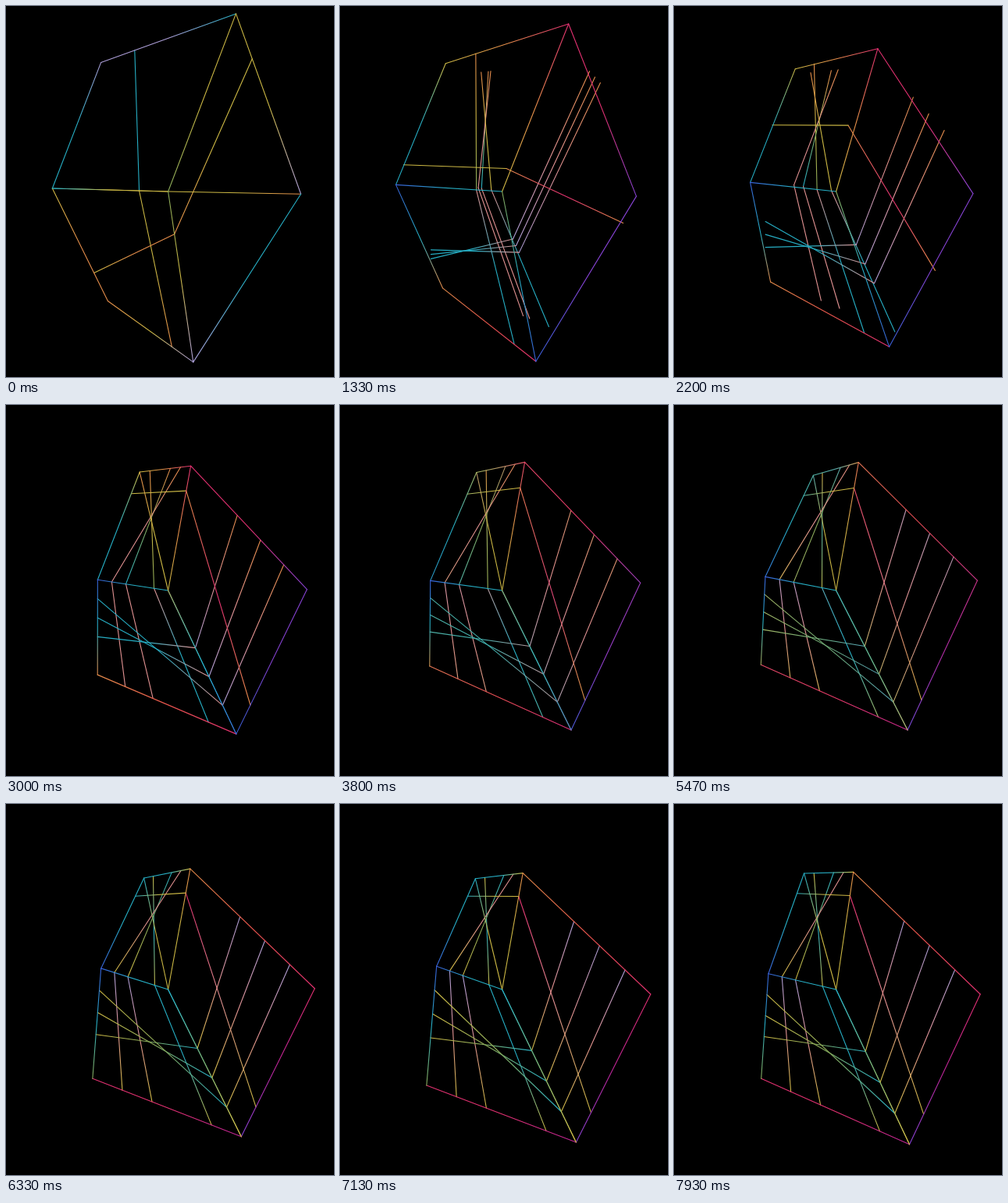
Recreate the animation shown at these times as an HTML page with a canvas. Size 420 by 476 pixels, loop 8 s.

```html
<!DOCTYPE html>
<html>
<head>
<meta charset="utf-8">
<style>
html, body { margin: 0; width: 100%; height: 100%; overflow: hidden; background: #000; }
canvas { display: block; }
</style>
</head>
<body>
<canvas width="420" height="476"></canvas>
<script>
const ctx = document.querySelector('canvas').getContext('2d');
const LOOP = 8000, STEP = 2000, MORPH_START = 867, MORPH_END = MORPH_START + STEP;

// Each corner drifts in a straight line from one key point to the next, one per STEP.
const corners = {
  A: [[118, 76], [125, 70], [171, 86], [180, 87], [176, 98], [159, 81]],
  B: [[275, 15], [310, 6], [237, 79], [237, 67], [236, 89], [225, 86]],
  C: [[62, 238], [58, 231], [118, 224], [114, 227], [125, 205], [118, 229]],
  D: [[378, 235], [378, 246], [386, 238], [384, 217], [400, 244], [386, 244]],
  E: [[243, 445], [238, 466], [295, 423], [298, 410], [303, 433], [301, 440]],
  F: [[124, 395], [136, 366], [118, 348], [112, 320], [111, 364], [113, 342]]
};
const hub = [208, 238];

const palette = {
  y: [204, 184, 68], o: [228, 140, 74], r: [232, 84, 76], p: [226, 48, 112],
  m: [190, 36, 150], v: [134, 66, 212], b: [56, 96, 216], c: [38, 174, 196],
  l: [172, 158, 216], s: [226, 146, 146], g: [136, 170, 90]
};

const mix = (a, b, f) => a.map((v, i) => v + (b[i] - v) * f);
const clamp = v => Math.max(0, Math.min(1, v));

function poseAt(t) {
  const phase = (t - MORPH_START) / STEP + 1, i = Math.floor(phase), pose = { O: hub };
  for (const k in corners) pose[k] = mix(corners[k][i], corners[k][i + 1], phase - i);
  return pose;
}

// A vertex on an edge such as 'AB', sliding from one fraction of it to another.
const on = (edge, f) => pose => mix(pose[edge[0]], pose[edge[1]], f);
const slide = (edge, from, to) => ({ from: on(edge, from), to: on(edge, to) });
const fan = (edge, to) => ({ bornAt: on(edge, .2), to: on(edge, to) });

// Three gradients per line: first, during the morph, and late.
const lines = [];
const addLine = (p, q, colors, late = false) =>
  lines.push({ p, q, late, colors: colors.split(' ') });
const addEdge = (edge, colors) =>
  addLine(slide(edge, 0, 0), slide(edge, 1, 1), colors);

// Strips running over the upper left and lower faces.
[
  [.2, 'ccc oyg ycy', 'yyo scc ccy'],
  [.6, 'ooo ogc cgy', 'sso sss lsy'],
  [.8, 'ooo oss ssy', 'sso sss lsy'],
  [0, 'ooo oyy cyy', 'occ scc ccy']
].forEach(([f, upper, lower], i) => {
  const vertex = edge => i ? fan(edge, f) : slide(edge, .25, f);
  addLine(vertex('AB'), vertex('OC'), upper, i > 0);
  addLine(vertex('OC'), vertex('EF'), lower, i > 0);
});

// Strips running over the lower and right faces.
[.4, .6, .8].forEach((f, i) => {
  const fold = slide('OE', .25, f);
  addLine(slide('CF', .75, 1 - f), fold, 'yoo ccs ygc', i > 0);
  addLine(fold, slide('BD', .25, f), 'oyy lso ysl', i > 0);
});

// Band crossing the upper left and right faces.
const bandFold = slide('BO', 1, .2);
addLine(slide('AC', 1, .2), bandFold, 'cyy yyy cyy');
addLine(bandFold, slide('DE', 0, .8), 'yyo opo psy');

addEdge('AB', 'llc yop ccy');
addEdge('CA', 'ccl ccy bcc');
addEdge('BD', 'yyl ppv orp');
addEdge('DE', 'ccl vvb pmv');
addEdge('EF', 'lyo pro mpp');
addEdge('FC', 'ooy ocb gcb');
addEdge('CO', 'cyy bcc bcc');
addEdge('BO', 'yyg poy oyy');
addEdge('OE', 'gyl gcb cgy');

function strokeLine(p, q, colorsA, colorsB, f) {
  const gradient = ctx.createLinearGradient(...p, ...q);
  for (let i = 0; i < 3; i++)
    gradient.addColorStop(i / 2, `rgb(${mix(palette[colorsA[i]], palette[colorsB[i]], f)})`);
  ctx.strokeStyle = gradient;
  ctx.beginPath();
  ctx.moveTo(...p);
  ctx.lineTo(...q);
  ctx.stroke();
}

function draw(t) {
  const before = poseAt(Math.min(t, MORPH_START));
  const after = poseAt(Math.max(t, MORPH_END));
  const morph = clamp((t - MORPH_START) / STEP);
  const place = v => mix(v.bornAt ? v.bornAt(after) : v.from(before), v.to(after), morph);
  const tint = clamp(t / 1333) + clamp((t - 3000) / 3333);
  const stage = Math.min(1, Math.floor(tint));

  ctx.setTransform(1, 0, 0, 1, 0, 0);
  ctx.fillStyle = '#000';
  ctx.fillRect(0, 0, 420, 476);
  ctx.translate(-.4, 0);
  ctx.lineWidth = 1.1;
  ctx.lineCap = 'round';
  for (const { p, q, late, colors } of lines) {
    if (late && t < MORPH_START) continue;
    strokeLine(place(p), place(q), colors[stage], colors[stage + 1], tint - stage);
  }
}

const start = performance.now();
function frame() {
  draw((performance.now() - start) % LOOP);
  requestAnimationFrame(frame);
}
frame();
</script>
</body>
</html>
```
